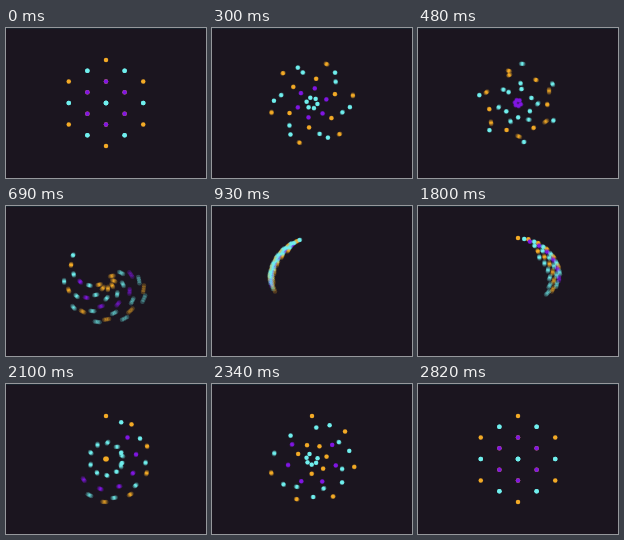
An HTML page with a canvas that plays this animation: 200 px wide and 150 px high, repeating every 2.85 s.

```html
<!DOCTYPE html>
<html>
<head>
<meta charset="utf-8">
<style>
html, body { margin: 0; width: 100%; height: 100%; overflow: hidden; background: #1b151f; }
canvas { display: block; }
</style>
</head>
<body>
<canvas id="stage" width="200" height="150"></canvas>
<script>
const LOOP = 2850, STEP = 30, SAMPLES = 4, SHUTTER = 15;
const ARM = 21.5, DOT = 2.25, TURN = Math.PI / 3;
const CYAN = '#70efee', ORANGE = '#f3aa26', PURPLE = '#8016e2';

// Corners of each hexagon, grouped by colour from back to front
const LAYERS = [[ORANGE, [4, 0]], [PURPLE, [2]], [CYAN, [1, 3, 5]]];

// Rows: time, progress of the ring, progress of the hexagons
const GATHER = [[45, 0, 0], [480, .082, .217], [705, .38, .58], [930, .79, .86], [1110, .93, .965], [1420, 1, 1]];
const SPREAD = [[1530, 0, 0], [1800, .233, .28], [2100, .607, .75], [2340, .837, .917], [2820, 1, 1]];

const out = document.getElementById('stage').getContext('2d');
const layer = document.createElement('canvas');
layer.width = 200;
layer.height = 150;
const ctx = layer.getContext('2d');

// Smooth curve through the keys, flat at both ends
function curve(keys, t, col) {
  const last = keys.length - 1;
  if (t <= keys[0][0]) return 0;
  if (t >= keys[last][0]) return 1;
  const i = keys.findIndex(key => key[0] > t) - 1;
  const slope = n => n === 0 || n === last ? 0 :
    (keys[n + 1][col] - keys[n - 1][col]) / (keys[n + 1][0] - keys[n - 1][0]);
  const a = keys[i], b = keys[i + 1], span = b[0] - a[0], u = (t - a[0]) / span;
  const s = u * u * (3 - 2 * u);
  return a[col] + (b[col] - a[col]) * s +
    span * u * (1 - u) * (slope(i) * (1 - u) - slope(i + 1) * u);
}

function drawDots(t) {
  const gathering = t < 1475;
  const angle = (n, col) => gathering
    ? (n - 6) * TURN * (1 - curve(GATHER, t, col))
    : n * TURN * curve(SPREAD, t, col);
  ctx.fillStyle = '#1b151f';
  ctx.fillRect(0, 0, 200, 150);
  ctx.fillStyle = '#18232d';
  ctx.fillRect(0, 0, 200, 1);
  for (const [color, corners] of LAYERS) {
    ctx.fillStyle = color;
    for (const j of corners) {
      for (let k = 5; k >= 0; k--) {
        const ring = angle(k, 1), tip = ring + angle(j, 2);
        ctx.beginPath();
        ctx.arc(100 + ARM * (Math.sin(ring) + Math.sin(tip)),
          75 - ARM * (Math.cos(ring) + Math.cos(tip)), DOT, 0, 2 * Math.PI);
        ctx.fill();
      }
    }
  }
}

const start = performance.now();
function frame() {
  const elapsed = (performance.now() - start) % LOOP;
  const t = Math.floor(elapsed / STEP) * STEP;
  // Average several moments for motion blur
  for (let i = 0; i < SAMPLES; i++) {
    drawDots(t + SHUTTER * (i / (SAMPLES - 1) - .5));
    out.globalAlpha = 1 / (i + 1);
    out.drawImage(layer, 0, 0);
  }
  requestAnimationFrame(frame);
}
frame();
</script>
</body>
</html>
```
